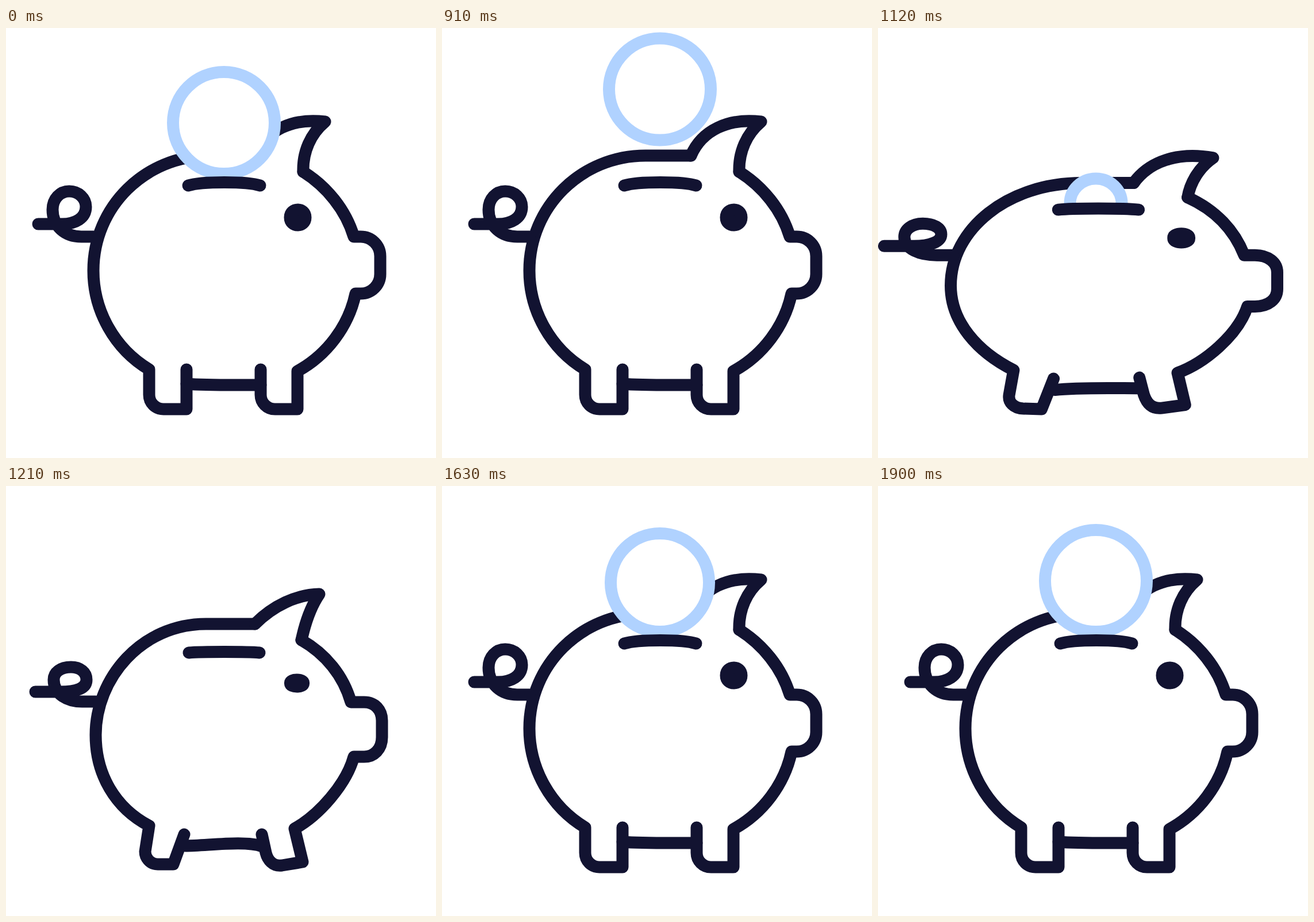
Animation of 748 by 748 pixels, one loop 1.93 s. Source, as an HTML page:

```html
<!DOCTYPE html>
<html lang="en">
<head>
<meta charset="utf-8">
<title>Piggy bank</title>
<style>
  html, body { margin: 0; height: 100%; overflow: hidden; background: #fff; }
  svg { display: block; width: 100vw; height: 100vh; }
  path { fill: none; stroke: #121331; stroke-width: 21; stroke-linecap: round; stroke-linejoin: round; }
  #eye { fill: #121331; }
  #coin { fill: #fff; stroke: #b0d2ff; }
</style>
</head>
<body>
<svg viewBox="0 0 748 748">
  <clipPath id="above"><rect id="mask" width="748" height="268"/></clipPath>
  <path id="back"/><path id="ear"/><path id="front"/><path id="belly"/><path id="tail"/><path id="eye"/>
  <g clip-path="url(#above)"><path id="coin"/></g>
  <path id="slot"/>
</svg>
<script>
const LOOP = 1930, STEP = 30;
const $ = id => document.getElementById(id);
const NUM = /-?[\d.]+/g;

// Each part: rest, hit, rebound and, where it lags behind, settle.
const parts = {
  back: [
    'M314 594L314 663L274 663C260 663 249 652 249 638L249 594C189 558 152 492 152 422C152 311 242 222 354 222L433 222',
    'M310 606L291 663L262 662C247 661 238 650 240 636L247 590C190 556 148 500 148 432C148 326 238 240 354 240L436 240',
    'M310 606L291 658L264 658C250 658 242 646 242 636L249 591C190 560 156 502 156 433C156 335 235 240 348 240L433 240'
  ],
  ear: [
    'M433 222C452 178 498 156 555 163C530 184 516 215 517 250',
    'M436 240C460 200 505 181 561 193C540 210 525 238 521 267',
    'M433 240C465 208 505 189 545 188C530 210 520 240 514 268',
    'M433 222C452 184 488 160 558 171C532 192 517 216 517 250'
  ],
  front: [
    'M517 250C558 276 591 316 605 363L617 363C636 363 651 378 651 397L651 428C651 447 636 462 617 462L608 462C596 519 558 569 507 597L507 663L468 663C454 663 443 652 443 638L443 594',
    'M521 267C566 291 595 330 610 375L627 375C648 375 662 389 662 407L662 438C662 458 648 471 627 471L615 471C600 525 547 577 505 595L517 655L480 661C463 663 456 650 452 636L445 604',
    'M514 268C556 292 587 330 600 376L623 376C642 376 654 390 654 408L654 437C654 458 640 471 623 471L605 471C592 519 544 573 502 596L516 654L480 660C464 662 455 650 452 638L445 606'
  ],
  belly: [
    'M443 621C410 621 350 622 314 619',
    'M445 624C410 624 350 622 312 627',
    'M446 627C415 616 350 626 312 626'
  ],
  tail: [
    'M56 341L98 341C120 341 139 331 139 311C139 296 126 284 110 284C94 284 81 297 81 316C81 345 103 363 131 363L152 363',
    'M43 358L90 358C115 358 133 350 133 336C133 324 121 316 104 316C87 316 75 327 75 341C75 364 100 375 126 375L152 375',
    'M51 358L95 358C122 358 140 352 140 337C140 324 129 315 113 315C95 315 83 324 83 337C83 363 108 375 132 375L156 375',
    'M56 343L98 343C120 343 139 335 139 317C139 303 126 294 110 294C94 294 81 305 81 320C81 347 103 363 131 363L152 363'
  ],
  eye: [
    'M494 329.5C494 311.5 521 311.5 521 329.5C521 347.5 494 347.5 494 329.5Z',
    'M498.5 343C497.5 332 524.5 332 523.5 343C524.5 354 497.5 354 498.5 343Z',
    'M494.5 343C493 335 519 335 517.5 343C519 351 493 351 494.5 343Z'
  ],
  slot: [
    'M317 274C340 266.5 420 266.5 442 274',
    'M317 290C340 287 420 287 444 290',
    'M318 290C340 288 420 288 441 290'
  ]
};

const mixNum = (a, b, k) => a + (b - a) * k;
const mixPath = (a, b, k) => {
  const to = b.match(NUM);
  let i = 0;
  return a.replace(NUM, v => mixNum(+v, +to[i++], k).toFixed(2));
};
// Full squash: the hit pose, wider and flatter.
const squash = d => {
  let i = 0;
  return d.replace(NUM, v => (i++ % 2 ? 663 + (v - 663) * .93 : 10.5 + (v - 43) * 1.105).toFixed(2));
};
const poses = {};
for (const [id, [rest, hit, rebound, settle = rest]] of Object.entries(parts))
  poses[id] = [rest, hit, squash(hit), rebound, settle, rest];

const poseTimes = [1000, 1030, 1120, 1210, 1390, 1450];
const easeOut = k => 1 - (1 - k) ** 2;

// Finds the segment of a list of times and the progress within it.
function locate(times, t) {
  const last = times.length - 1;
  if (t <= times[0]) return [0, 0];
  if (t >= times[last]) return [last - 1, 1];
  const i = times.findIndex(x => x > t) - 1;
  return [i, (t - times[i]) / (times[i + 1] - times[i])];
}
function sample(rows, t) {
  const [i, k] = locate(rows.map(r => r[0]), t);
  return rows[i].slice(1).map((v, j) => mixNum(v, rows[i + 1][j + 1], k));
}

// time, top, widest y, half width, bottom, side handle, bottom handle
const squeeze = [
  [1000, 48.5, 137, 88.5, 225.5, 48.9, 48.9],
  [1030, 67.5, 148, 85.5, 265.5, 46, 52],
  [1060, 112, 180, 74, 310, 45, 40],
  [1090, 185, 240, 60, 345, 45, 30],
  [1120, 262, 305, 45, 370, 40, 20],
  [1150, 335, 360, 35, 400, 20, 18]
];
const hop = [[1630, 0], [1660, -24], [1690, -37], [1720, -39.5], [1750, -31],
  [1780, -18.5], [1810, -11], [1840, -6], [1870, -2], [1900, 0]];

const disc = (size, dy) => {
  const r = 88.5 * size, bottom = 253.5 + dy, h = r * .5523;
  return [bottom - 2 * r, bottom - r, r, bottom, h, h];
};
function coinShape(t) {
  if (t < 1000) return disc(1, Math.min(0, 61 * (((t - 875) / 170) ** 2 - 1)));
  if (t < 1150) return sample(squeeze, t);
  if (t <= 1510) return null;
  return disc(easeOut(Math.min(1, (t - 1510) / 147)), sample(hop, t)[0]);
}
function coinPath([top, mid, w, bottom, side, low]) {
  const x = 379, l = x - w, r = x + w, h = w * .5523, up = mid - (mid - top) * .5523;
  return `M${l} ${mid}C${l} ${up} ${x - h} ${top} ${x} ${top}C${x + h} ${top} ${r} ${up} ${r} ${mid}` +
    `C${r} ${mid + side} ${x + low} ${bottom} ${x} ${bottom}C${x - low} ${bottom} ${l} ${mid + side} ${l} ${mid}Z`;
}

function draw(t) {
  const [i, k] = locate(poseTimes, t);
  const e = i === 2 ? k ** 1.5 : easeOut(k);
  for (const id in poses) $(id).setAttribute('d', mixPath(poses[id][i], poses[id][i + 1], e));

  const slot = $('slot').getAttribute('d').match(NUM).map(Number);
  $('mask').setAttribute('height', (slot[1] + 3 * slot[3]) / 4);
  const shape = coinShape(t);
  $('coin').setAttribute('d', shape ? coinPath(shape) : '');
}

const start = performance.now();
function tick() {
  const t = (performance.now() - start) % LOOP;
  draw(10 + Math.floor((t - 10) / STEP) * STEP);
  requestAnimationFrame(tick);
}
tick();
</script>
</body>
</html>
```
